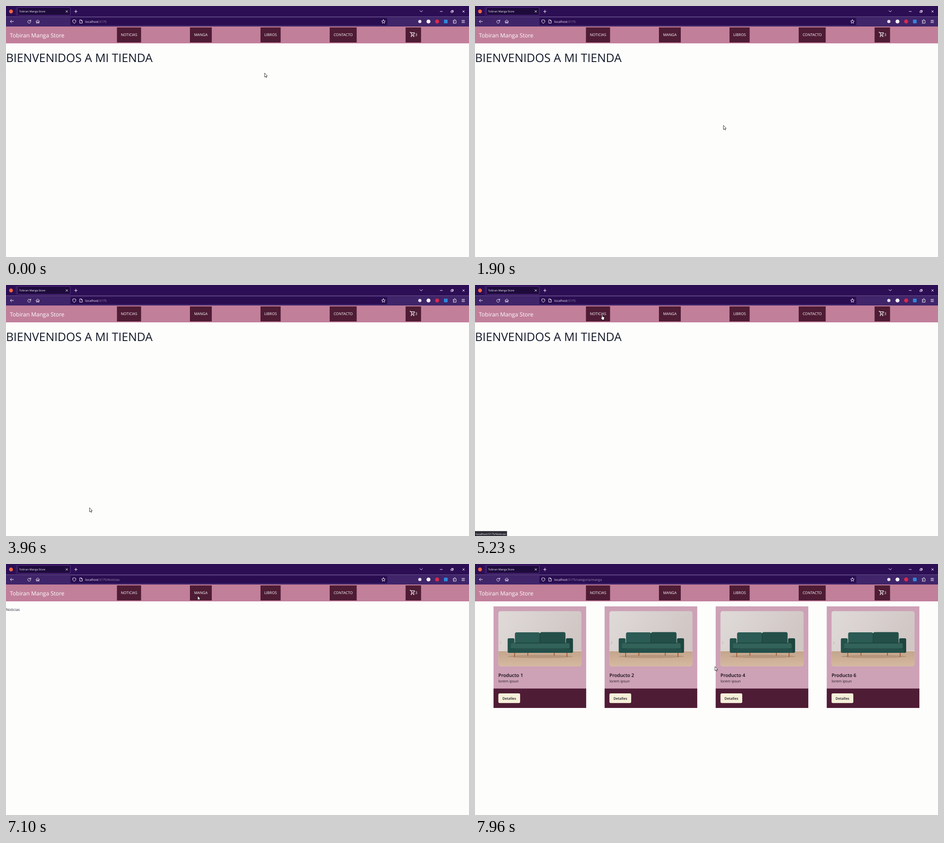
An HTML page that plays this animation: 1017 px wide and 551 px high, repeating every 8 s.

```html
<!DOCTYPE html>
<html lang="es">
<head>
<meta charset="utf-8">
<title>Tobiran Manga Store</title>
<style>
  html, body { margin: 0; width: 100%; height: 100%; overflow: hidden; background: #fdfdfc; }
  svg { display: block; width: 1017px; height: 551px; }
  text { font-family: "Open Sans", "Noto Sans", sans-serif; text-rendering: geometricPrecision; white-space: pre; }
  .icon { fill: none; stroke: #f3eefa; stroke-width: 1; stroke-linecap: round; stroke-linejoin: round; }
</style>
</head>
<body>
<svg id="stage" viewBox="0 0 1017 551" xmlns="http://www.w3.org/2000/svg"></svg>
<script>
const LOOP = 8000;
const STORE = "Tobiran Manga Store";
const DARK = "#4f1c35";

const rect = (x, y, w, h, fill, extra = "") =>
  `<rect x="${x}" y="${y}" width="${w}" height="${h}" fill="${fill}" ${extra}/>`;
const text = (x, y, size, fill, str, extra = "") =>
  `<text x="${x}" y="${y}" font-size="${size}" fill="${fill}" ${extra}>${str}</text>`;
const icon = (x, y, d, extra = "") =>
  `<path class="icon" transform="translate(${x} ${y})" d="${d}" ${extra}/>`;
const disc = (x, y, r, fill) => `<circle cx="${x}" cy="${y}" r="${r}" fill="${fill}"/>`;

const CROSS = "M-2-2L2 2M2-2L-2 2";
const ARROW_BACK = "M3.6 0H-3.6M-.6-3L-3.6 0L-.6 3";

function browserChrome() {
  return [
    rect(0, 0, 1017, 23.5, "#2c0e55"),
    rect(0, 23.5, 1017, 21.5, "#40256a"),
    disc(11, 12, 4.2, "#f2643c"),
    rect(22, 2, .8, 20, "#5b3a86"),
    rect(25.3, 3, 116, 17.5, "#1e0b3c", 'rx="2" stroke="#6c3ca3" stroke-width=".9"'),
    text(29, 14.2, 5.95, "#f6f2fb", STORE),
    icon(133.5, 12, CROSS, 'stroke-width=".8"'),
    icon(153.5, 12, "M-3 0H3M0-3V3"),
    icon(912, 11.5, "M-3-1.5L0 1.5L3-1.5"),
    icon(956, 12, "M-2.5 0H2.5", 'stroke-width=".8"'),
    icon(980, 12, "M-2.3-.9H1.1V2.3H-2.3ZM-1-.9V-2.3H2.5V1.1H1.1", 'stroke-width=".8"'),
    icon(1005, 12, CROSS, 'stroke-width=".8"'),
    icon(13, 34, ARROW_BACK),
    icon(32, 34, ARROW_BACK, 'style="stroke:#84709f;scale:-1 1"'),
    icon(51, 34.3, "M2.6-1.9A3.3 3.3 0 1 0 3.3.7M3.4-3.8V-1.2H.8"),
    icon(69.7, 34, "M-3.8 0L0-3.5L3.8 0M-2.8-.6V3.5H-.9V.9H.9V3.5H2.8V-.6"),
    rect(141.5, 26, 696, 16.3, "#2a0d50", 'rx="2"'),
    icon(150, 34, "M0-3.7L3.3-2.6V0C3.3 2 1.8 3.2 0 3.9C-1.8 3.2-3.3 2-3.3 0V-2.6Z", 'stroke-width=".9"'),
    icon(165, 34, "M-2.6-3.5H.6L2.6-1.5V3.6H-2.6ZM.4-3.4V-1.2H2.5", 'stroke-width=".9"'),
    `<text x="174" y="36.8" font-size="6.97" fill="#f5f0fb">localhost<tspan id="path" fill="#a08fb8"></tspan></text>`,
    icon(829, 34, "M0-4L1.2-1.3L4.1-1L1.9 1L2.5 3.8L0 2.4L-2.5 3.8L-1.9 1L-4.1-1L-1.2-1.3Z", 'stroke-width=".9"'),
    disc(909, 34, 3.5, "#e9e2f2"),
    disc(928, 34, 4.3, "#f8f7fa"),
    disc(947, 34, 4.4, "#da2a4d"),
    rect(962, 30, 8, 8, "#2f86dc", 'rx="1"'),
    icon(985.5, 34, "M-3-2H-.9V-3A1.1 1.1 0 0 1 1.3-3V-2H3.2V3.8H-3V1.8H-2A1.1 1.1 0 0 0-2-.4H-3Z", 'stroke-width=".9"'),
    icon(1004.3, 34, "M-3-2.5H3M-3 0H3M-3 2.5H3")
  ].join("");
}

function navbar() {
  const links = [[243.7, 53, "NOTICIAS"], [404, 48, "MANGA"], [559, 44.3, "LIBROS"], [711, 59.3, "CONTACTO"], [877.7, 34, ""]];
  return rect(0, 45, 1017, 37, "#c17f9a") +
    text(8.6, 69, 12.4, "#fff", STORE) +
    links.map(([x, w, label]) => rect(x, 47, w, 33, DARK) +
      text(x + w / 2, 65.7, 8.12, "#fff", label, 'text-anchor="middle"')).join("") +
    icon(887, 57, "M.2.6H2L4.4 6H8.4L10.5 1.9H2.8M4.2 6.2L3.2 8H9.6", 'style="stroke:#fff;stroke-width:1.1"') +
    disc(890.2, 67, 1.1, "#fff") + disc(895.6, 67, 1.1, "#fff") +
    text(898.7, 65.9, 8.1, "#fff", "3");
}

function sofaPhoto() {
  const legs = [86, 115, 173, 201].map((x, i) => rect(x - 40.7, i % 3 ? 194 : 193, 1.8, i % 3 ? 7 : 11, "#a5582e"));
  return `<g class="photo" clip-path="url(#photoClip)">` + [
    rect(10, 103, 184, 122, "url(#wall)"),
    rect(10, 191, 184, 34, "url(#floor)"),
    rect(10, 190, 184, 1.4, "#e3dbd6"),
    rect(14, 170, 3, 6, "#d0c7c2"),
    `<ellipse cx="103" cy="203" rx="72" ry="3.5" fill="#9d7a61" opacity=".45"/>`,
    ...legs,
    rect(47, 150, 55, 28, "#2b5b54", 'rx="4"'),
    rect(102, 149.5, 56, 28, "#244f49", 'rx="4"'),
    rect(101.4, 152, .9, 22, "#12322f"),
    rect(31, 163, 15, 32, "#23514b", 'rx="3"'),
    rect(159, 163, 15.5, 32, "#1d453f", 'rx="3"'),
    rect(38, 174, 129, 12.5, "#326259", 'rx="3"'),
    rect(38, 185.5, 129, 1.2, "#143832"),
    rect(36, 186.5, 133, 8.5, "#23504a", 'rx="1"'),
    rect(46, 172.8, 113, 1.5, "#17403a")
  ].join("") + "</g>";
}

function card(number, i) {
  return `<g transform="translate(${40.7 + 243.97 * i} 0)">` +
    rect(0, 93, 203.5, 181, "#cda1b6") + rect(0, 273.4, 203.5, 42.6, DARK) +
    sofaPhoto() +
    text(10.6, 248.4, 10.4, "#0b0710", "Producto " + number, 'font-weight="600"') +
    text(10.6, 260.2, 8, "#271f2c", "lorem ipsun") +
    rect(10.6, 284, 47.8, 21.3, "#f6f0da", 'rx="3"') +
    text(34.5, 298, 7.7, "#1d1820", "Detalles", 'font-weight="600" text-anchor="middle"') + "</g>";
}

const gradient = (id, from, to, axis) =>
  `<linearGradient id="${id}" ${axis}><stop stop-color="${from}"/><stop offset="1" stop-color="${to}"/></linearGradient>`;

document.getElementById("stage").innerHTML =
  `<defs>${gradient("wall", "#dfdad8", "#d0c6c4", 'x2="1" y2=".4"')}${gradient("floor", "#c3a58c", "#d5b9a0", 'x2="0" y2="1"')}
  <clipPath id="photoClip"><rect x="10.6" y="103.4" width="182.4" height="121.2" rx="5"/></clipPath></defs>` +
  rect(0, 0, 1017, 551, "#fdfdfc") + browserChrome() + navbar() +
  `<g id="home">${text(0, 123, 25.65, "#111827", "BIENVENIDOS A MI TIENDA")}</g>
  <g id="news">${text(0, 102.8, 8.08, "#1f2330", "Noticias")}</g>
  <g id="shop">${[1, 2, 4, 6].map(card).join("")}</g>
  <g id="status"><rect id="statusBox" x="-1" y="540.5" height="12" fill="#2b2a33" stroke="#4b4a55" stroke-width=".7"/>
  ${text(2, 548.6, 6.1, "#f5f5f7", "", 'id="statusText"')}</g>
  <g id="pointer" stroke="#111" stroke-width=".8" stroke-linejoin="round" fill="#fff">
    <path id="arrow" d="M0 0V9.2L2.1 7.3L3.5 10.3L4.9 9.7L3.6 6.8H6.2Z"/>
    <path id="hand" d="M-1.8 1Q-.8-.5.2 1V4.6L3.2 5.2Q4.3 5.5 4.2 6.8L3.6 9.6V11.5H-1.4V10L-3.9 7Q-3.6 5.5-1.8 6.9Z"/>
  </g>`;

const $ = id => document.getElementById(id);
const show = (el, on) => { el.style.display = on ? "" : "none"; };
const within = (t, a, b) => t >= a && t < b;

// Pointer route: [ms, x, y]
const route = [
  [0, 568, 147], [400, 615, 160], [830, 671, 172], [930, 673, 174], [1640, 668, 174],
  [2450, 168, 534], [2800, 171, 490], [3400, 174, 503], [4200, 186, 485],
  [4900, 277, 68], [5230, 280, 65], [6300, 280, 66], [6750, 318, 88],
  [7100, 421, 70], [7300, 431, 66], [7640, 431, 65], [7960, 527, 225], [8000, 529, 227]
];

function pointerAt(t) {
  const i = route.findIndex(p => p[0] > t);
  const [t0, x0, y0] = route[i - 1], [t1, x1, y1] = route[i];
  const u = (t - t0) / (t1 - t0), e = u * u * (3 - 2 * u);
  return [x0 + (x1 - x0) * e, y0 + (y1 - y0) * e];
}

const NEWS_AT = 5900, SHOP_AT = 7530, PHOTOS_AT = 7610;
const photos = document.querySelectorAll(".photo");

function render(t) {
  const overNews = within(t, 4890, 6570), overManga = within(t, 7130, 7750);
  const page = t < NEWS_AT ? "home" : t < SHOP_AT ? "news" : "shop";
  for (const id of ["home", "news", "shop"]) show($(id), id === page);
  $("path").textContent = ":5175" + { home: "", news: "/Noticias", shop: "/categoria/manga" }[page];
  photos.forEach(p => show(p, t >= PHOTOS_AT));

  show($("status"), overNews || overManga);
  $("statusText").textContent = "localhost:5175" + (overManga ? "/categoria/manga" : "/Noticias");
  $("statusBox").setAttribute("width", overManga ? 97 : 71);

  show($("hand"), overNews || overManga);
  show($("arrow"), !overNews && !overManga);
  $("pointer").setAttribute("transform", `translate(${pointerAt(t)})`);
}

function tick() {
  render(performance.now() % LOOP);
  requestAnimationFrame(tick);
}
tick();
</script>
</body>
</html>
```
